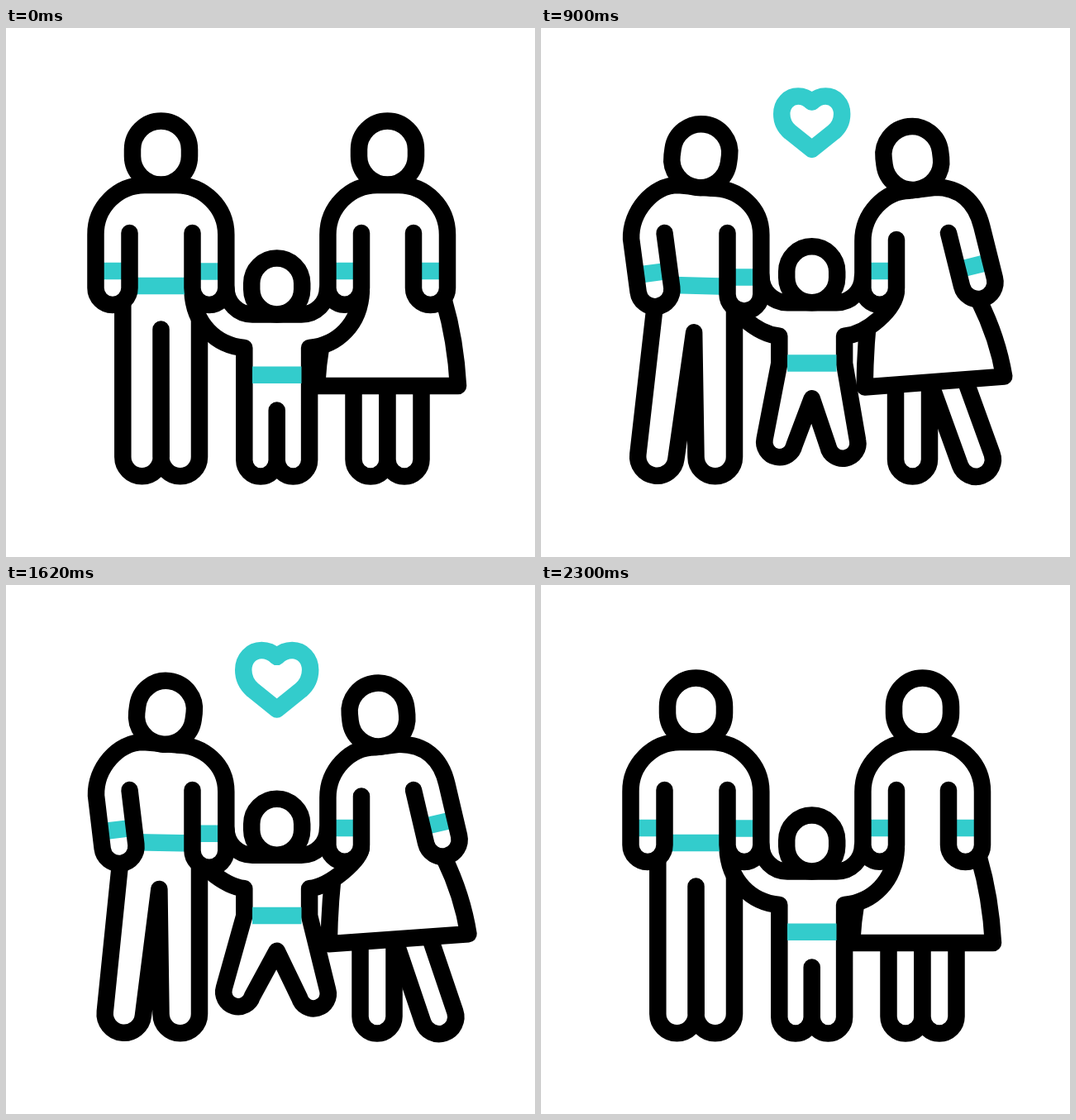
Write an HTML page with a canvas that moves like this. It is 640 px wide and 640 px high and loops after 2.4 s.

```html
<!DOCTYPE html>
<html lang="en">
<head>
<meta charset="utf-8">
<title>Family</title>
<style>
html, body { margin: 0; width: 100%; height: 100%; overflow: hidden; background: #fff; }
canvas { display: block; width: 640px; height: 640px; }
</style>
</head>
<body>
<canvas id="stage" width="640" height="640"></canvas>
<script>
const ctx = document.getElementById('stage').getContext('2d');
const LOOP = 2400, BEGIN = 120, LINE = 20.5, TEAL = '#33cccc', MID = 327.7;

const rad = deg => deg * Math.PI / 180;
const ramp = (t, from, to) => Math.min(1, Math.max(0, (t - from) / (to - from)));
const ease = (t, from, to) => { const u = ramp(t, from, to); return u * u * (3 - 2 * u); };

// Quick lean that settles, then eases back upright.
const lean = (t, end) => 1.01 * (1 - Math.exp(-Math.max(0, t - BEGIN) / 282)) * (1 - ease(t, 1465, end));

// Slow nod that overshoots by `back` on its return.
const nod = (t, back) => ease(t, BEGIN, 1260) - (1 + back) * ease(t, 1490, 1980) + back * ease(t, 1980, 2300);

// Three equal hops.
const hop = t => 20 * Math.sin(Math.PI * 3 * ramp(t, BEGIN, BEGIN + 3 * 592)) ** 2;

// Grows in, beats, then shrinks away.
const beat = t => (.97 + .1 * Math.cos(2 * Math.PI * (t - 490) / 910))
  * ease(t, BEGIN, 400) * (1 - ramp(t, 1580, 2240) ** 2);
const fade = t => ease(t, BEGIN, 200) * (1 - ease(t, 1920, 2200));

function spin([x, y], [px, py], deg) {
  const c = Math.cos(rad(deg)), s = Math.sin(rad(deg));
  return [px + (x - px) * c - (y - py) * s, py + (x - px) * s + (y - py) * c];
}

function shape(d, fill = '#fff', stroke = '#000') {
  const path = new Path2D(d);
  if (fill) { ctx.fillStyle = fill; ctx.fill(path); }
  if (stroke) { ctx.strokeStyle = stroke; ctx.stroke(path); }
}

function band(a, b) {
  ctx.lineCap = 'butt';
  shape(`M${a}L${b}`, null, TEAL);
  ctx.lineCap = 'round';
}

// Both ends of a foot cap: left and right of its centre.
function foot(x, y, r, deg) {
  const dx = r * Math.cos(rad(deg)), dy = r * Math.sin(rad(deg));
  return [[x - dx, y - dy], [x + dx, y + dy]];
}

function head(x, y, r, straight, deg) {
  ctx.save();
  ctx.translate(x, y);
  ctx.rotate(rad(deg));
  shape(`M${-r} ${-r - straight}a${r} ${r} 0 0 1 ${2 * r} 0v${straight}a${r} ${r} 0 0 1 ${-2 * r} 0z`);
  ctx.restore();
}

function heart(k, alpha) {
  if (alpha <= 0) return;
  const side = s => {
    const p = (x, y) => `${s * x * k} ${y * k} `;
    return `M${p(0, -28.5)}C${p(6, -34)}${p(13, -36.5)}${p(19, -36.5)}`
      + `C${p(32, -36.5)}${p(41.7, -26)}${p(41.7, -12)}`
      + `C${p(41.7, -1)}${p(37, 7)}${p(30, 13)}L${p(0, 37)}`;
  };
  ctx.save();
  ctx.globalAlpha = alpha;
  ctx.translate(MID, 114.5);
  shape(side(-1) + side(1), null, TEAL);
  ctx.restore();
}

function mumLower(p) {
  shape(`M${420.5 + 9 * p} 420V522a20.5 20.5 0 0 0 41 0V420`);
  ctx.save();
  ctx.translate(482 + 3 * p, 400 + 8 * p);
  ctx.rotate(rad(-21 * p));
  shape('M-20.5 20V122a20.5 20.5 0 0 0 41 0V20');
  ctx.restore();
  shape(`M${393 + 6 * p} 330Q${379 + 14 * p} 380 ${376 + 16.5 * p} ${433 + 1.5 * p}`
    + `L${547 + 14 * p} ${433 - 12 * p}Q${544 + 9 * p} ${378 - 3 * p} 530 330`);
}

function dadLower(p) {
  const [out, inn] = foot(164.5 - 25.5 * p, 519 - .5 * p, 23.2, 7.5 * p);
  shape(`M${141.3 - 3 * p} 330L${out}A23.2 23.2 0 0 0 ${inn}L${187.5 - 2.5 * p} ${364.5 + 4 * p}`
    + 'L187.5 519a23.2 23.2 0 0 0 46.5 0V330');
}

function child(d) {
  const r = 19.7 - .1 * d, y = 387 - d, bend = 420 - d;
  const [l1, l2] = foot(308 - 1.37 * d, 522.7 - 1.53 * d, r, .85 * d);
  const [r1, r2] = foot(347.4 + 1.25 * d, 522.7 - 1.42 * d, r, -.8 * d);
  const drop = 358 - 1.3 * d, cuff = 34.3 - .4 * d;
  shape(`M225.5 318C227 ${drop} ${288.3 - cuff} ${y - 3} 288.3 ${y}V${bend}L${l1}A${r} ${r} 0 0 0 ${l2}`
    + `L${MID} ${462.5 - d}L${r1}A${r} ${r} 0 0 0 ${r2}L367.1 ${bend}V${y}`
    + `C${367.1 + cuff} ${y - 3} 428.4 ${drop} 429.9 318L389 ${315 - d}`
    + `a31.5 31.5 0 0 1 -31.5 31.5H298a31.5 31.5 0 0 1 -31.5 -31.5z`);
  band([298, 419.7 - d], [357.5, 419.7 - d]);
  head(MID, 346.5 - d, 30.5, 7, 0);
}

function dadUpper(p) {
  const turn = (x, y) => spin([x, y], [149.5, 248], -8 * p);
  const low = 314.5 + 8 * p, cuff = 294.5 + 7.5 * p, neck = 190 + 4 * p;
  const d = `M149.5 248L${turn(149.5, 314.5)}A20.5 20.5 0 0 1 ${turn(108.5, 314.5)}L${turn(108.5, 250)}`
    + `C108 ${217 + 6 * p} 135 190 ${168 - 2 * p} 190L206 ${neck}C239 ${neck} 266.3 217 266.3 250`
    + `V${low}a20.4 20.4 0 0 1 -40.8 0V248`;
  shape(d, '#fff', null);
  band(turn(108.5, 294), turn(149.5, 294));
  band([225.5, cuff], [266, cuff]);
  band([152 + 8 * p, 312 - p], [225.5, 312 + .7 * p]);
  shape(d, null);
}

function mumUpper(p) {
  const turn = (x, y) => spin([x, y], [493, 248], -14.8 * p);
  const left = 190 + 7 * p, right = 190 + 3 * p;
  const d = `M430 ${248 + 8.5 * p}V314.5a20.3 20.3 0 0 1 -40.6 0V${250 + 8 * p}`
    + `C389.4 ${217 + 8 * p} 416 ${left} ${449 - 3 * p} ${left}L${475 + 2 * p} ${right}`
    + `C${508 - 3 * p} ${right} ${turn(534, 217)} ${turn(534, 250)}L${turn(534, 314.5)}`
    + `A20.5 20.5 0 0 1 ${turn(493, 314.5)}L493 248`;
  shape(d, '#fff', null);
  band([389.5, 294], [430, 294]);
  band(turn(493, 294), turn(534, 294));
  shape(d, null);
}

function draw(t) {
  const dad = lean(t, 2090), mum = lean(t, 2210);
  ctx.fillStyle = '#fff';
  ctx.fillRect(0, 0, 640, 640);
  ctx.lineWidth = LINE;
  ctx.lineCap = ctx.lineJoin = 'round';
  mumLower(mum);
  dadLower(dad);
  child(hop(t));
  dadUpper(dad);
  mumUpper(mum);
  head(187.5 + .7 * dad, 189.5 + 3.5 * dad, 34.5, 8, 10 * nod(t, .54));
  head(461.5 - 8 * mum, 189.5 + 6.5 * mum, 34.5, 8, -9 * nod(t, 1.05));
  heart(beat(t), fade(t));
}

const start = performance.now();
function tick() {
  draw((performance.now() - start) % LOOP);
  requestAnimationFrame(tick);
}
tick();
</script>
</body>
</html>
```
